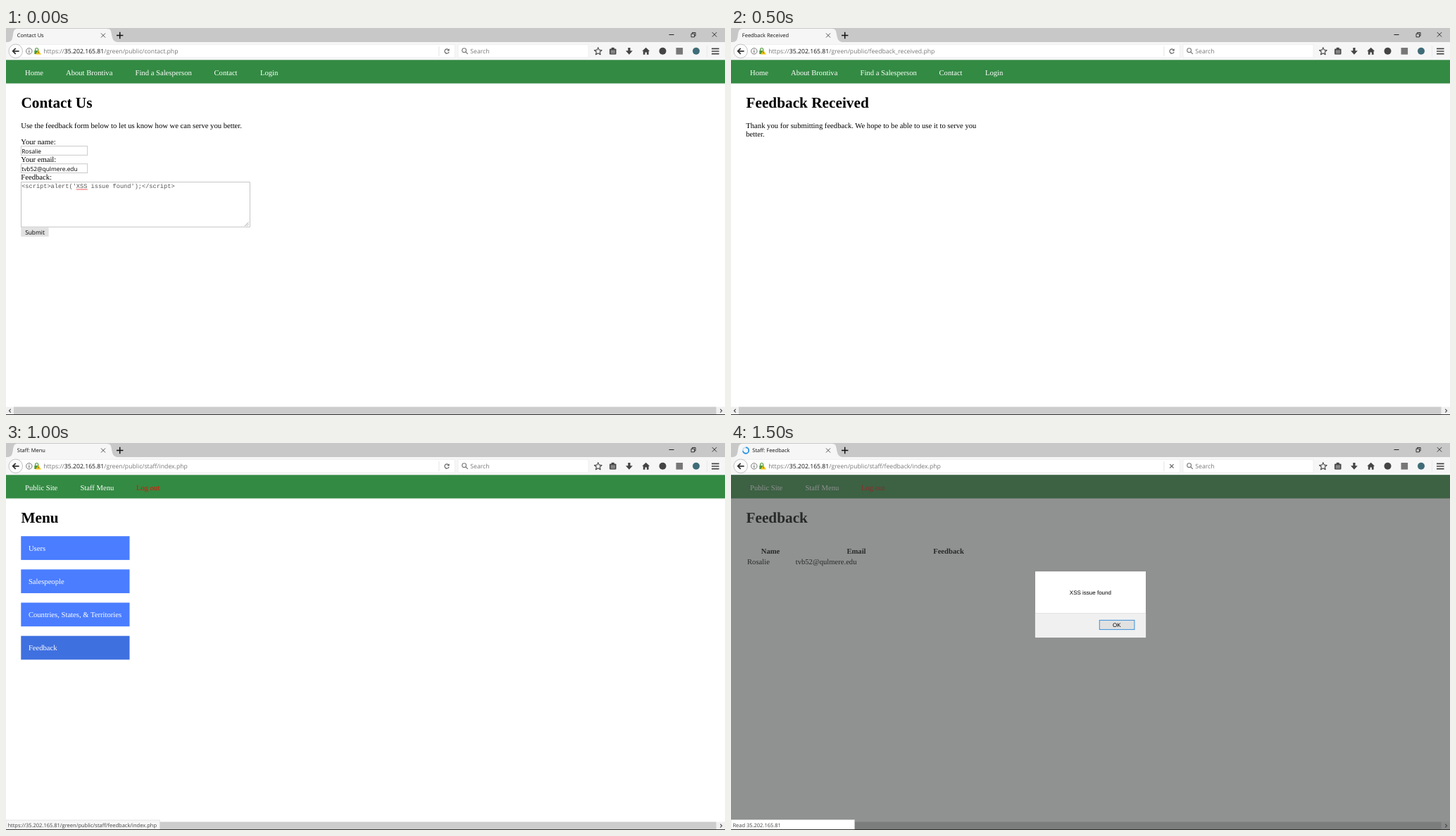
Write an HTML page that moves like this. It is 1021x549 px and loops after 2 s.

```html
<!DOCTYPE html>
<html lang="en">
<head>
<meta charset="utf-8">
<title>Feedback form walkthrough</title>
<style>
  html, body { margin: 0; width: 100%; height: 100%; overflow: hidden; background: #fff; }
  svg { display: block; width: 1021px; height: 549px; }
  text { white-space: pre; text-rendering: geometricPrecision; }
  .serif { font: 10.64px "Liberation Serif", "Times New Roman", serif; }
  .bold { font-weight: 700; }
  .h1 { font: 700 21.27px "Liberation Serif", "Times New Roman", serif; }
  .ui { font: 7.5px "Open Sans", "Noto Sans", sans-serif; }
  .url { font: 8.68px "Open Sans", "Noto Sans", sans-serif; }
  .field { font: 8.4px "Open Sans", "Noto Sans", sans-serif; }
  .mono { font: 8.65px "Liberation Mono", monospace; }
  .dialog { font: 8px "Liberation Sans", Arial, sans-serif; }
  .line { fill: none; stroke: #444; }
</style>
</head>
<body>
<svg id="stage" viewBox="0 0 1021 549"></svg>
<script>
const STEP = 500;
const USER = 'Rosalie', EMAIL = 'tvb52@qulmere.edu';
const HOST = '35.202.165.81', ROOT = '/green/public/';

const esc = s => s.replace(/&/g, '&amp;').replace(/</g, '&lt;');
const text = (x, y, s, cls, fill = '#000', more = '') =>
  `<text x="${x}" y="${y}" class="${cls}" fill="${fill}" ${more}>${esc(s)}</text>`;
const mid = (x, y, s, cls, fill) => text(x, y, s, cls, fill, 'text-anchor="middle"');
const rect = (x, y, w, h, fill, more = '') =>
  `<rect x="${x}" y="${y}" width="${w}" height="${h}" fill="${fill}" ${more}/>`;
const line = (d, more = '') => `<path class="line" d="${d}" ${more}/>`;
const shape = (d, fill = '#444') => `<path d="${d}" fill="${fill}"/>`;
const cross = (x, y, r, more) =>
  line(`M${x - r} ${y - r}l${2 * r} ${2 * r}m0 ${-2 * r}l${-2 * r} ${2 * r}`, more);

function star(cx, cy, r) {
  const pts = Array.from({ length: 10 }, (_, i) => {
    const a = i * Math.PI / 5 - Math.PI / 2, q = i % 2 ? r * 0.45 : r;
    return `${(cx + q * Math.cos(a)).toFixed(2)} ${(cy + q * Math.sin(a)).toFixed(2)}`;
  });
  return line(`M${pts.join('L')}Z`, 'stroke-width="1.1" stroke-linejoin="round"');
}

function windowFrame() {
  return rect(0, 0, 1021, 20, '#c8c8c8') +
    shape('M3 20C9 19 9 15 10 9C11 3 12 1 17 1H143C149 1 149 4 150 9C151 15 152 19 158 20Z', '#f6f6f6') +
    cross(138, 10.5, 3, 'style="stroke:#555"') +
    line('M157 10.5h9.4M161.7 5.8v9.4', 'style="stroke:#111" stroke-width="1.5"') +
    line('M941.5 9.5h7', 'style="stroke:#222"') +
    line('M973 8.2h4.6v4.6h-4.6zM974.5 8v-1.5h4.6v4.6h-1.4', 'style="stroke:#222" stroke-width=".9"') +
    cross(1006, 9.3, 3.2, 'style="stroke:#222" stroke-width=".9"');
}

function toolbar() {
  return rect(0, 20, 1021, 25.5, '#f6f6f6') +
    rect(14, 23.5, 623.5, 18.5, '#fff', 'stroke="#ebebeb" stroke-width=".7"') +
    rect(642, 23.5, 185, 18.5, '#fff', 'stroke="#ebebeb" stroke-width=".7"') +
    rect(614.5, 26, 0.8, 14, '#ddd') +
    '<circle cx="13.7" cy="32.8" r="9.8" fill="#fcfcfc" stroke="#bbb" stroke-width=".9"/>' +
    line('M18.6 32.8H10M13.7 28.8l-4 4 4 4', 'style="stroke:#333" stroke-width="1.8"') +
    '<circle cx="32.8" cy="32.8" r="4.2" fill="none" stroke="#666" stroke-width=".9"/>' +
    rect(32.3, 32, 1, 3.3, '#555') + rect(32.3, 30.2, 1, 1.1, '#555') +
    line('M41.6 32.5v-2a2 2 0 0 1 4 0v2', 'style="stroke:#4b9a3b" stroke-width="1.2"') +
    rect(40.3, 32, 6.4, 5, '#4b9a3b') +
    shape('M46 31.6L50 37.6H42Z', '#f5c518') + rect(45.6, 33.6, 0.8, 2.2, '#554400') +
    '<circle cx="650.6" cy="31.7" r="2.9" fill="none" stroke="#777" stroke-width="1.1"/>' +
    line('M652.8 33.9l3 3', 'style="stroke:#777" stroke-width="1.3"') +
    text(659.3, 36.2, 'Search', 'url', '#777', 'font-style="italic"');
}

function toolIcons() {
  return star(840.8, 33.2, 5.6) +
    rect(857, 29.5, 9.5, 8, '#444', 'rx="1"') + rect(859.7, 27.8, 4, 2.2, '#444') +
    line('M858.5 32h6.5M858.5 33.7h6.5M858.5 35.4h6.5', 'style="stroke:#f6f6f6" stroke-width=".6"') +
    shape('M883.3 28h3.2v4.3h3.3l-4.9 5.4-4.9-5.4h3.3z') +
    shape('M908.7 27.8l5.4 5h-1.5v5h-2.7v-3.4h-2.4v3.4h-2.7v-5h-1.5z') +
    '<circle cx="932.5" cy="32.8" r="5" fill="#444"/>' +
    rect(951.5, 28, 9.6, 9.6, '#777') +
    '<circle cx="980" cy="32.8" r="5" fill="#3f6c78"/>' +
    rect(995, 25, 0.8, 16, '#e6e6e6') +
    line('M1002 29.3h10.6M1002 33h10.6M1002 36.7h10.6', 'stroke-width="1.7"');
}

function scrollbar() {
  return rect(0, 537.5, 1021, 11, '#f0f0f0') + rect(11, 537.5, 997.5, 10.7, '#cdcdcd') +
    line('M6.7 540.7l-2.3 2.3 2.3 2.3M1014.3 540.7l2.3 2.3-2.3 2.3', 'stroke-width="1.1"');
}

const bottomEdge = rect(0, 548.1, 1021, 0.9, '#222');

function nav(items) {
  return rect(0, 45.3, 1021, 33.3, '#338a43') +
    items.map(([x, s, c = '#fff']) => text(x, 66.7, s, 'serif', c)).join('');
}
const publicNav = nav([[27, 'Home'], [85, 'About Brontiva'], [183.5, 'Find a Salesperson'],
  [295.5, 'Contact'], [361, 'Login']]);
const staffNav = nav([[27, 'Public Site'], [105.4, 'Staff Menu'], [185, 'Log out', '#f00']]);

const heading = s => text(21.5, 113, s, 'h1');
const para = (y, s) => text(21.3, y, s, 'serif');

function address(path) {
  return `<text x="53.2" y="36.2" class="url" fill="#777">https://<tspan fill="#111">${HOST}</tspan>${ROOT}${path}</text>`;
}
const tabTitle = (s, x = 15.8) => text(x, 13.4, s, 'ui', '#111');
const reload =
  line('M628.6 31.2a3.1 3.1 0 1 0 .4 2.6', 'style="stroke:#666" stroke-width="1.2"') +
  shape('M629.6 29.2v3.4h-3.4z', '#666');

function status(w, y, s, fill) {
  return rect(0, y, w, 548.2 - y, fill, 'stroke="#d5d5d5" stroke-width=".6"') +
    text(2.4, 544.9, s, 'ui', '#444');
}

function input(y, s) {
  return rect(21.5, y, 94.2, 12.6, '#fff', 'stroke="#bcbcbc" stroke-width=".8"') +
    text(22.2, y + 10, s, 'field');
}

function contactPage() {
  let zig = 'M99.8 229.6';
  for (let i = 0; i < 8; i++) zig += `l1 ${-1.2}l1 ${1.2}`;
  return publicNav + heading('Contact Us') +
    para(142.2, 'Use the feedback form below to let us know how we can serve you better.') +
    para(165.2, 'Your name:') + input(167.7, USER) +
    para(190.2, 'Your email:') + input(192.8, EMAIL) +
    para(215.2, 'Feedback:') +
    rect(21.5, 218.7, 324.8, 63.5, '#fff', 'stroke="#b4b4b4" stroke-width=".8"') +
    text(22.2, 227.3, "<script>alert('XSS issue found');<\/script>", 'mono', '#555') +
    line(zig, 'style="stroke:#e22" stroke-width=".7"') +
    line('M339 281l5.5-5.5M341.5 281l3-3', 'style="stroke:#999" stroke-width=".8"') +
    rect(21.2, 283.2, 39.4, 12.7, '#e1e1e1') + mid(41, 292.9, 'Submit', 'field') +
    scrollbar();
}

function thanksPage() {
  return publicNav + heading('Feedback Received') +
    para(142.2, 'Thank you for submitting feedback. We hope to be able to use it to serve you') +
    para(154.4, 'better.') + scrollbar();
}

function menuPage() {
  const items = ['Users', 'Salespeople', 'Countries, States, & Territories', 'Feedback'];
  return staffNav + heading('Menu') +
    items.map((s, i) => {
      const y = 132.2 + i * 47.15;
      return rect(21.3, y, 154.2, 33.7, i === 3 ? '#3f70e0' : '#4a7dff') +
        text(31.9, y + 20.4, s, 'serif', '#fff');
    }).join('') +
    scrollbar() +
    status(218.5, 535, `https://${HOST}${ROOT}staff/feedback/index.php`, '#f6f6f6');
}

function alertPage() {
  return staffNav + heading('Feedback') +
    mid(56, 156.6, 'Name', 'serif bold') + mid(178, 156.6, 'Email', 'serif bold') +
    mid(309, 156.6, 'Feedback', 'serif bold') +
    text(23, 171.8, USER, 'serif') + text(91.7, 171.8, EMAIL, 'serif') +
    scrollbar() +
    rect(0, 45.3, 1021, 503.7, '#434445', 'opacity=".59"') +
    rect(431.5, 181.8, 158, 94.6, '#fff', 'stroke="#777" stroke-width=".7"') +
    rect(431.9, 241.3, 157.2, 34.8, '#f0f0f0') + rect(431.9, 241, 157.2, 0.7, '#dfdfdf') +
    mid(510.4, 214.5, 'XSS issue found', 'dialog') +
    rect(523.3, 251.4, 49.6, 13.2, '#e1e1e1', 'stroke="#3c8fd8"') +
    mid(547.7, 260.8, 'OK', 'dialog') +
    status(175.3, 534.5, `Read ${HOST}`, '#fff');
}

const spinner = '<circle cx="21" cy="10.6" r="4.2" fill="none" stroke="#bcdcf5" stroke-width="1.8"/>' +
  line('M21 6.4a4.2 4.2 0 1 1-4.1 5', 'style="stroke:#2f95e0" stroke-width="1.8"');

const scenes = [
  contactPage() + tabTitle('Contact Us') + address('contact.php') + reload,
  thanksPage() + tabTitle('Feedback Received') + address('feedback_received.php') + reload,
  menuPage() + tabTitle('Staff: Menu') + address('staff/index.php') + reload,
  alertPage() + spinner + tabTitle('Staff: Feedback', 30.3) + address('staff/feedback/index.php') +
    cross(625.8, 32.8, 2.7, 'style="stroke:#666" stroke-width="1.2"')
];

const stage = document.getElementById('stage');
stage.innerHTML = rect(0, 0, 1021, 549, '#fff') + windowFrame() + toolbar() + toolIcons() +
  scenes.map(s => `<g class="scene" visibility="hidden">${s}</g>`).join('') + bottomEdge;

const groups = [...stage.querySelectorAll('.scene')];
const start = performance.now();
let shown = -1;
function draw() {
  const now = Math.floor((performance.now() - start) / STEP) % groups.length;
  if (now !== shown) {
    groups.forEach((g, i) => g.setAttribute('visibility', i === now ? 'visible' : 'hidden'));
    shown = now;
  }
  requestAnimationFrame(draw);
}
draw();
</script>
</body>
</html>
```
